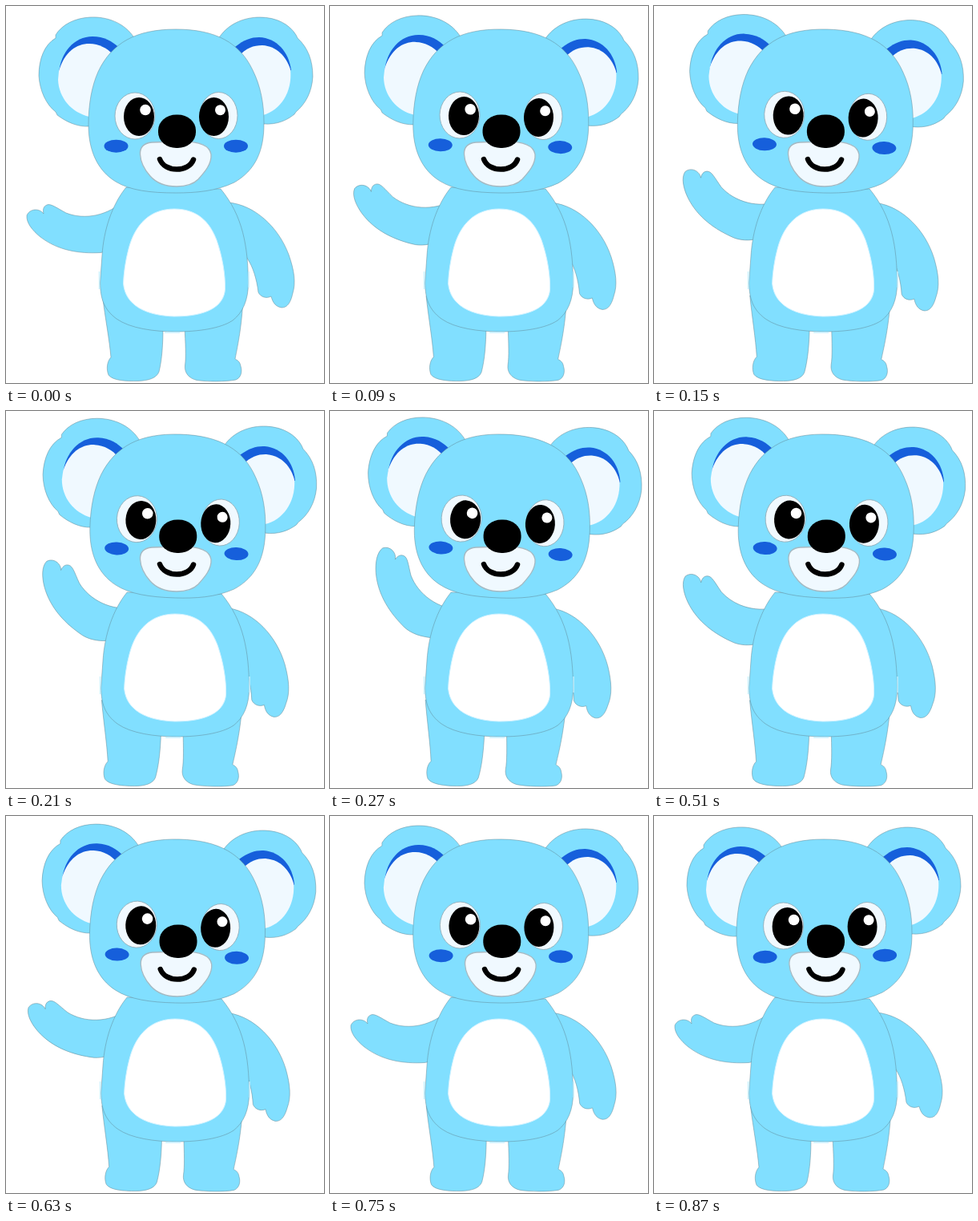
An HTML page for the animation above (0.9 s loop, 397 by 470 pixels).

```html
<!DOCTYPE html>
<html lang="en">
<head>
<meta charset="utf-8">
<title>Waving koala</title>
<style>
  html, body { margin: 0; width: 100%; height: 100%; overflow: hidden; background: #fff; }
  svg { display: block; width: 100vw; height: 100vh; }
  .skin { fill: #81dfff; stroke: #5f8490; stroke-width: .6; stroke-opacity: .8; }
  .pale { fill: #f0f9ff; }
  .rim { stroke: #8fa6b0; stroke-width: .8; }
  .blue { fill: #165fdb; }
  .seam { fill: none; stroke: #c4f0ff; stroke-width: 1.4; }
</style>
</head>
<body>
<svg viewBox="0 0 397 470">
  <g id="armL">
    <path class="skin" d="M150 240C128 262 98 267 75 258C62 251 56 246 51 248C46 250 46 255 47 259C42 252 30 252 26 261C25 270 33 280 43 288C65 305 92 309 118 307.500C130 306 140 300 150 291Z"/>
  </g>
  <g id="armR">
    <path class="skin" d="M278 245C310 248 340 275 353 310C360 330 362 345 358 358C355 372 350 376 344 376C337 375 333 370 331 362C325 365 318 363 315 357C313 340 308 325 302 316L282 280Z"/>
  </g>
  <g id="legL">
    <path class="skin" d="M120.500 362C124 390 129 415 131 438C126 443 125 453 128 460C133 467 150 468 165 467.500C178 467 188 464 191 456C195 440 196 420 196 400L160 360Z"/>
  </g>
  <g id="legR">
    <path class="skin" d="M223 400C224 420 225 438 223.500 448C222.500 457 228 464 238 466.500C250 468.500 275 468.500 287 466C294 463 295 455 293 449C292 442 287 441 286 440C290 420 294 400 296 366L259 360Z"/>
  </g>
  <g id="body">
    <path class="skin" d="M150 226C132 248 122 280 120 310L117.500 345C118 365 122 378 138 390C155 402 185 406 212 406C240 406 268 402 283 392C296 382 302.500 366 302.500 345C302 300 296 262 268 228Z"/>
    <path class="seam" d="M116.500 331V353M303 331V351M198 407H217"/>
    <path fill="#fff" stroke="#d3f3ff" d="M210 253C238 253 254 268 263 292C270 312 274 335 273.500 353C272 375 250 387 210 387C176 386 149 374 146.500 346C147 333 149 318 153 303C161 272 180 253 210 253Z"/>
  </g>
  <g id="ears">
    <path class="skin" d="M161 41C148 20 125 13 105 14C86 15 70 23 62 36L62 40C48 48 41 66 41 87C42 105 50 123 62 132L64 136C76 145 90 151 104 150L140 110Z"/>
    <path class="blue" d="M66 84C68 58 85 38 108 38C122 38 133 44 141 52L125 90Z"/>
    <path class="pale" d="M66 81C73 57 88 47 104 47C116 47 127 53 133 60L140 100L104 138C82 133 66 115 65 92Z"/>
    <path class="skin" d="M265 41C276 23 296 14 317 14C338 14 354 23 362 36L364 40C377 52 383 68 383 88C382 107 374 122 362 132L360 135C350 143 338 148 322 147L290 110Z"/>
    <path class="blue" d="M286 51C297 42 306 39 316 39C338 40 353 57 356 80L310 90Z"/>
    <path class="pale" d="M290 63C300 52 309 49 320 49C338 50 350 63 355 79C358 108 342 130 321 136L290 100Z"/>
  </g>
  <g id="head">
    <path class="skin" d="M212 29C262 29 292 46 308 80C318 100 322 122 322 145C322.500 181 311 205 285 220C262 231 237 233 212 233C180 233 155 230 137 219C114 205 103 180 103 148C103 122 107 100 115 82C132 46 162 29 212 29Z"/>
  </g>
  <g id="eyes">
    <ellipse class="pale rim" cx="161" cy="137" rx="25" ry="29"/>
    <ellipse class="pale rim" cx="265.500" cy="136.500" rx="23.500" ry="29"/>
    <ellipse cx="166" cy="138" rx="19" ry="24"/>
    <ellipse cx="259.500" cy="138" rx="18.500" ry="24"/>
    <circle cx="174" cy="129.500" r="6.800" fill="#fff"/>
    <circle cx="267.500" cy="129.700" r="6.500" fill="#fff"/>
  </g>
  <g id="cheeks" class="blue">
    <ellipse cx="137.500" cy="174.700" rx="15" ry="8"/>
    <ellipse cx="287" cy="174.700" rx="15" ry="8"/>
  </g>
  <g id="muzzle">
    <path class="pale" stroke="#a5b9c2" stroke-width="1.300" d="M212 169C235 168 254 171 256 185C257 197 248 207 240 216C233 223 224 225 213 225C200 225 188 221 180 212C172 203 168 195 167.500 185C167 176 172 171 182 170Z"/>
    <path fill="none" stroke="#000" stroke-width="6.500" stroke-linecap="round" d="M192 191C198 207.700 228 207.700 234 191.500"/>
  </g>
  <g id="nose">
    <rect x="190" y="135.500" width="47" height="41.500" rx="22.500" ry="19.500"/>
  </g>
</svg>
<script>
const LOOP = 900, STEP = 30;

// Linear interpolation through [time, value] points
function track(t, keys) {
  for (let i = 1; i < keys.length; i++) {
    const [t0, a] = keys[i - 1], [t1, b] = keys[i];
    if (t <= t1) return a + (b - a) * (t - t0) / (t1 - t0);
  }
  return keys[keys.length - 1][1];
}

function pose(id, angle, px, py, dx = 0) {
  document.getElementById(id).setAttribute('transform',
    `translate(${dx} 0) rotate(${angle} ${px} ${py})`);
}

function draw(ms) {
  const t = Math.floor(ms % LOOP / STEP) * STEP;
  const tilt = track(t, [[0, 0], [360, 1.06], [870, 0]]);
  const wave = track(t, [[0, 0], [310, 54.7], [510, 26.7], [630, 10.5], [720, 0]]);
  const sway = track(t, [[0, 0], [300, 1], [870, 0]]);
  const drift = track(t, [[0, 0], [360, 0], [870, 1]]);
  const shift = Math.min(1, t / 60);

  pose('armL', wave, 148, 261);
  pose('armR', 7 * tilt, 268, 250);
  pose('legL', 2.9 * sway, 160, 330);
  pose('legR', 2.3 * sway, 259, 330);
  pose('body', 0, 0, 0, 1.1 * shift);
  pose('ears', 4.3 * tilt, 212, 192);
  pose('head', 2.7 * tilt, 212, 190, 0.9 * tilt);
  pose('eyes', 4.3 * tilt, 212, 188, 0.6 * drift);
  pose('cheeks', 4.1 * tilt - 0.8 * drift, 212, 180, 0.6 * tilt + 1.2 * drift);
  pose('muzzle', 0, 0, 0, 1.4 * drift);
  pose('nose', 0, 0, 0, 2 * tilt + drift);
}

const start = performance.now();
function tick() {
  draw(performance.now() - start);
  requestAnimationFrame(tick);
}
tick();
</script>
</body>
</html>
```
